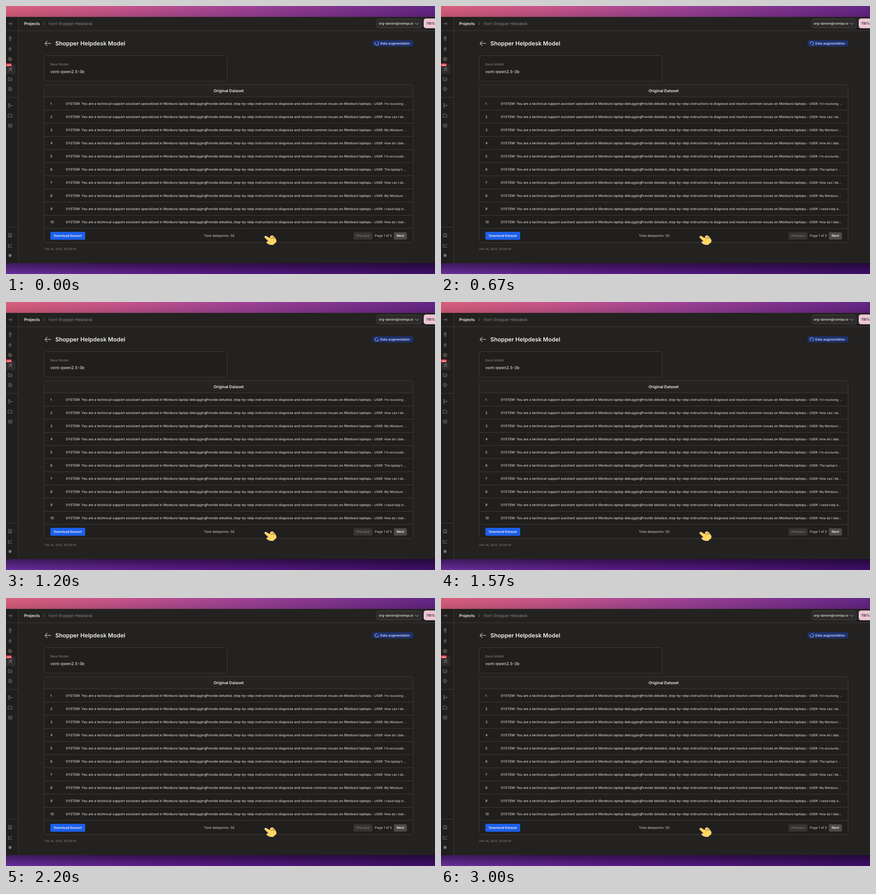
Write an HTML page that moves like this. It is 948 px wide and 591 px high and loops after 3.03 s.

```html
<!DOCTYPE html>
<html lang="en">
<head>
<meta charset="utf-8">
<title>Dataset page</title>
<style>
  html, body { margin: 0; width: 100%; height: 100%; overflow: hidden; background: #232221; }
  svg { display: block; width: 948px; height: 591px; }
  text { font: 7.25px Inter, sans-serif; fill: #d0cfcd; text-rendering: geometricPrecision; white-space: pre; }
  .semi { font-weight: 600; fill: #f1f0ee; }
  .dim { fill: #858482; }
  #rows text { font-size: 7.35px; font-weight: 500; }
  #rows .tail { font-size: 6.85px; }
  .mid { text-anchor: middle; }
  .line { fill: none; stroke: #3d3c3a; }
  .card { fill: #201f1d; stroke: #3f3e3c; }
  .icon { fill: none; stroke: #858482; stroke-width: .9; stroke-linecap: round; stroke-linejoin: round; }
</style>
</head>
<body>
<svg viewBox="0 0 948 591">
  <defs>
    <linearGradient id="top">
      <stop stop-color="#dc607f"/><stop offset=".25" stop-color="#c9568c"/>
      <stop offset=".55" stop-color="#a04398"/><stop offset="1" stop-color="#652687"/>
    </linearGradient>
    <linearGradient id="bottom">
      <stop stop-color="#7232aa"/><stop offset=".4" stop-color="#621d92"/>
      <stop offset="1" stop-color="#431070"/>
    </linearGradient>
    <linearGradient id="shade" x2="0" y2="1">
      <stop stop-color="#000" stop-opacity=".5"/><stop offset="1" stop-color="#000" stop-opacity=".08"/>
    </linearGradient>
    <linearGradient id="topShade" x2="0" y2="1">
      <stop stop-color="#000" stop-opacity="0"/><stop offset="1" stop-color="#000" stop-opacity=".15"/>
    </linearGradient>
    <path id="hand" d="M571.500 508L575 507.500 583 512.500 584 508 587.500 506 591 507.500 594.500 511.500
      597 516V520.500L590 526.500 583 526 577.500 523.500 575.500 520.500 580.500 519 572 510.500z"/>
  </defs>

  <rect width="948" height="25" fill="url(#top)"/>
  <rect width="948" height="25" fill="url(#topShade)"/>
  <rect y="566" width="948" height="25" fill="url(#bottom)"/>
  <rect y="566" width="948" height="25" fill="url(#shade)"/>
  <rect y="24" width="948" height="543" fill="#232221"/>
  <rect y="24" width="27" height="543" fill="#201f1e"/>
  <path class="line" d="M27.5 24V567M0 54.5H948M0 201.5H27M0 487.5H27"/>

  <!-- sidebar -->
  <rect x="-3" y="129" width="24" height="21" rx="3" fill="#2d2c2b"/>
  <g class="icon">
    <path d="M5 39h6M9 36.8l2.2 2.2-2.2 2.2M12.800 36v6"/>
    <path d="M7 68h4.500M7.700 68v8h3v-8M7.700 71.500h3"/>
    <path d="M10 91l-4 4.500h2.700L8 99.200l4.200-5H9.500z"/>
    <path d="M9 113l4 2-4 2-4-2zM5 117l4 2 4-2M5 119l4 2 4-2"/>
    <path d="M5.500 158h2.500l1 1.200h4v5.500H5.500zM8 162h3"/>
    <path d="M7 179h4l2.300 4-2.300 4H7l-2.300-4z"/><circle cx="9" cy="183" r="1.500"/>
    <circle cx="6.500" cy="216" r="1.200"/><circle cx="6.500" cy="222.500" r="1.200"/>
    <circle cx="12" cy="219.500" r="1.200"/><path d="M6.500 217.200v4M7 218c1 1.500 2 1.500 3.700 1.500"/>
    <path d="M5 238h3l1 1.300h4v5.700H5z"/>
    <rect x="5" y="260.500" width="8" height="6.500" rx="1"/><path d="M7 265v-2M9 265v-2h1M11.500 265v-2"/>
    <rect x="5.500" y="501.500" width="7" height="8" rx="1"/><path d="M5.500 507.500h7M8 504h2.500"/>
    <path d="M5 524v8h8M6.500 529.500l2-2.500 1.500 1 3-3.500"/>
  </g>
  <path class="icon" style="stroke:#d4d3d1" d="M6.500 136.500l6.500 6.500M6 143l2.500-2.500M10.500 136l2 .5-.5 2"/>
  <rect y="126.500" width="12.500" height="6.500" rx="1.500" fill="#d9363e"/>
  <text class="semi" x="1.500" y="131.500" style="font-size:4.300px">NEW</text>
  <circle cx="9" cy="550" r="3.500" fill="#6f6e6c"/>

  <!-- header -->
  <text class="semi" x="40" y="42" style="font-size:8.800px">Projects</text>
  <path class="icon" d="M83 35.800l3 3.200-3 3.200"/>
  <text class="dim" x="94" y="42" style="font-size:8.700px">Vont Shopper Helpdesk</text>
  <rect x="819.500" y="28.500" width="98" height="20" rx="4" fill="#2d2c2b" stroke="#444341"/>
  <text x="824" y="41.300" style="font-size:7.150px;font-weight:500;fill:#e9e8e6">org-dalven@vontqa.io</text>
  <path class="icon" style="stroke:#d5d4d2" d="M904.500 37.500l3.200 3.200 3.200-3.200"/>
  <rect x="923" y="27.500" width="40" height="21.500" rx="5" fill="#edc5d6"/>
  <text class="semi" x="929" y="41.300" style="font-size:7.500px;fill:#2c2028">110%</text>

  <!-- title -->
  <path class="icon" style="stroke:#a9a8a6;stroke-width:1.400" d="M99 82.500H86M91 77.500l-5 5 5 5"/>
  <text class="semi" x="109" y="87" style="font-size:12.700px">Shopper Helpdesk Model</text>
  <rect x="810" y="75.500" width="90" height="13.500" rx="5" fill="#1f316f"/>
  <path id="spinner" d="M3.800 0A3.800 3.800 0 1 1 1.170 -3.610" fill="none" stroke="#a9c0ff" stroke-linecap="round"/>
  <text class="semi" x="827" y="85" style="font-size:7.150px;fill:#c8d6ff">Data augmentation</text>

  <rect class="card" x="84.500" y="109.500" width="404" height="56" rx="4"/>
  <text class="dim" x="98" y="131.200">Base Model</text>
  <text x="98" y="148" style="font-size:9px;font-weight:500">vont-qwen2.5-3b</text>

  <!-- table -->
  <rect class="card" x="84.500" y="173.500" width="815" height="348" rx="4"/>
  <rect x="85" y="174" width="814" height="26" rx="3.500" fill="#252422"/>
  <text class="semi mid" x="492" y="190.300" style="font-size:8.600px">Original Dataset</text>
  <g id="rows"></g>
  <rect x="98" y="498" width="77" height="17.500" rx="2.500" fill="#1c60ea"/>
  <text class="semi mid" x="136.500" y="509.300" style="font-size:7px">Download Dataset</text>
  <text class="mid" x="471" y="509.300">Total datapoints: 50</text>
  <rect x="768" y="499" width="42" height="16" rx="3" fill="#353433"/>
  <text class="mid dim" x="789" y="509.300">Previous</text>
  <text class="mid" x="834" y="509.300">Page 1 of 5</text>
  <rect x="857" y="499" width="29" height="16" rx="3" fill="#4b4a49"/>
  <text class="mid semi" x="871.500" y="509.300">Next</text>
  <text class="dim" x="85" y="538" style="font-size:6.300px">Feb 26, 2025, 00:09:49</text>

  <!-- hand cursor -->
  <g stroke-linejoin="round">
    <use href="#hand" x="-.3" y=".8" fill="#3a1226" stroke="#3a1226" stroke-width="2"/>
    <use href="#hand" fill="#ffd65c" stroke="#fff2c4" stroke-width=".8"/>
    <path d="M584 510l4 4M587.500 508.500l4 4M591 509.500l3 4" fill="none" stroke="#8a4a2a"/>
  </g>
</svg>
<script>
  const LOOP = 3030, TURNS = 3;
  const tails = ["I'm receiving ...", "How can I de...", "My Monburo ...", "How do I deb...", "I'm encounte...",
    "The laptop's ...", "How can I de...", "My Monburo ...", "I need help d...", "How do I deb..."];

  const row = (tail, i) => {
    const top = 200.5 + 29 * i, y = top + 17.2;
    return `<path class="line" d="M85 ${top}H899"/>
      <text x="98" y="${y}">${i + 1}</text>
      <text y="${y}"><tspan x="132">SYSTEM: You are a technical support assistant specialized in Monburo laptop debugging.</tspan><tspan
        x="442">Provide detailed, step-by-step instructions to diagnose and resolve common issues on Monburo laptops.</tspan></text>
      <text class="tail" x="809" y="${y}">- USER: ${tail}</text>`;
  };
  document.getElementById("rows").innerHTML =
    tails.map(row).join("") + '<path class="line" d="M85 490.5H899"/>';

  const spinner = document.getElementById("spinner");
  const start = performance.now();
  function draw() {
    const phase = (performance.now() - start) % LOOP / LOOP;
    spinner.setAttribute("transform", `translate(819.5 82.5) rotate(${phase * TURNS * 360 - 72})`);
    requestAnimationFrame(draw);
  }
  draw();
</script>
</body>
</html>
```
